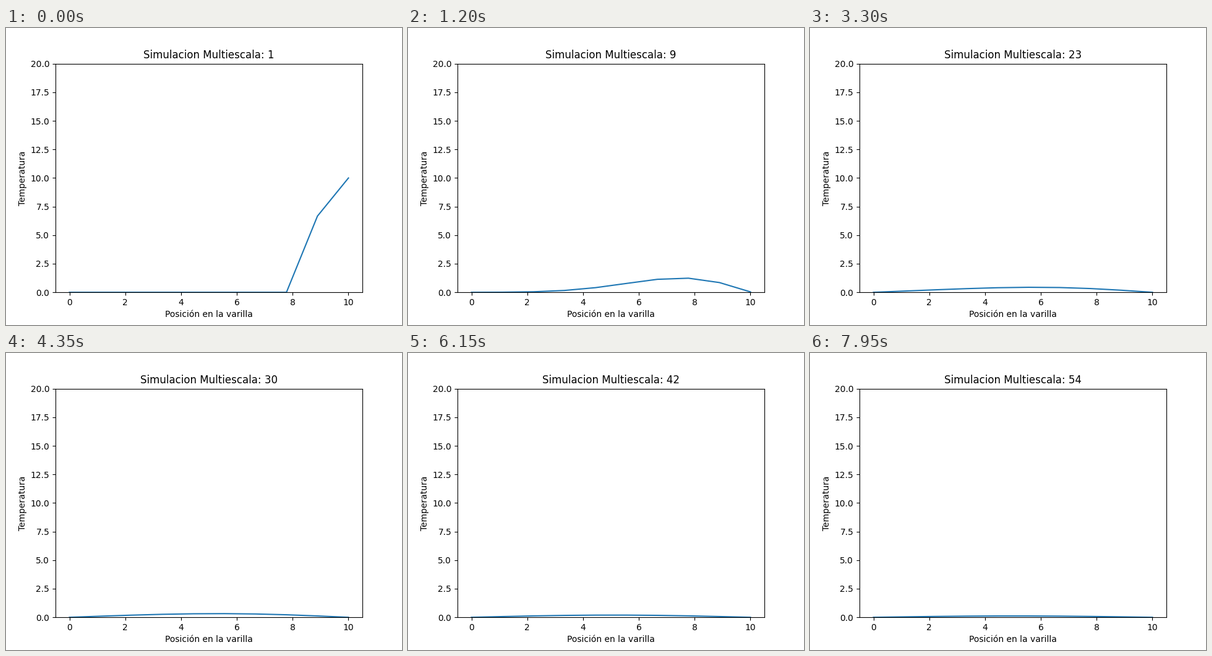
Animation of 640 by 480 pixels, one loop 8000 ms. Source, as a matplotlib script:

```python
import matplotlib.pyplot as plt
import numpy as np
from matplotlib.animation import FuncAnimation

STEPS = 54
TICK_MS = 50
TICKS_PER_STEP = 3
TICKS = 160
NODES = 10


def diffuse(temp):
    """Average each inner node with its neighbours; both ends lose half their heat."""
    new = temp / 2
    new[1:-1] = (temp[:-2] + temp[1:-1] + temp[2:]) / 3
    return new


def simulate():
    temp = np.zeros(NODES)
    temp[-1] = 20
    history = []
    for _ in range(STEPS):
        temp = diffuse(temp)
        history.append(temp)
    return history


history = simulate()

fig, ax = plt.subplots(figsize=(6.4, 4.8), dpi=100)
line, = ax.plot(np.linspace(0, 10, NODES), history[0])
ax.set_xlim(-0.5, 10.5)
ax.set_ylim(0, 20)
ax.set_xlabel("Posición en la varilla")
ax.set_ylabel("Temperatura")
title = ax.set_title("")


def update(tick):
    step = tick // TICKS_PER_STEP
    line.set_ydata(history[step])
    title.set_text(f"Simulacion Multiescala: {step + 1}")
    return line, title


anim = FuncAnimation(fig, update, frames=TICKS, interval=TICK_MS,
                     repeat=True, repeat_delay=0, blit=False)
plt.show()
```
